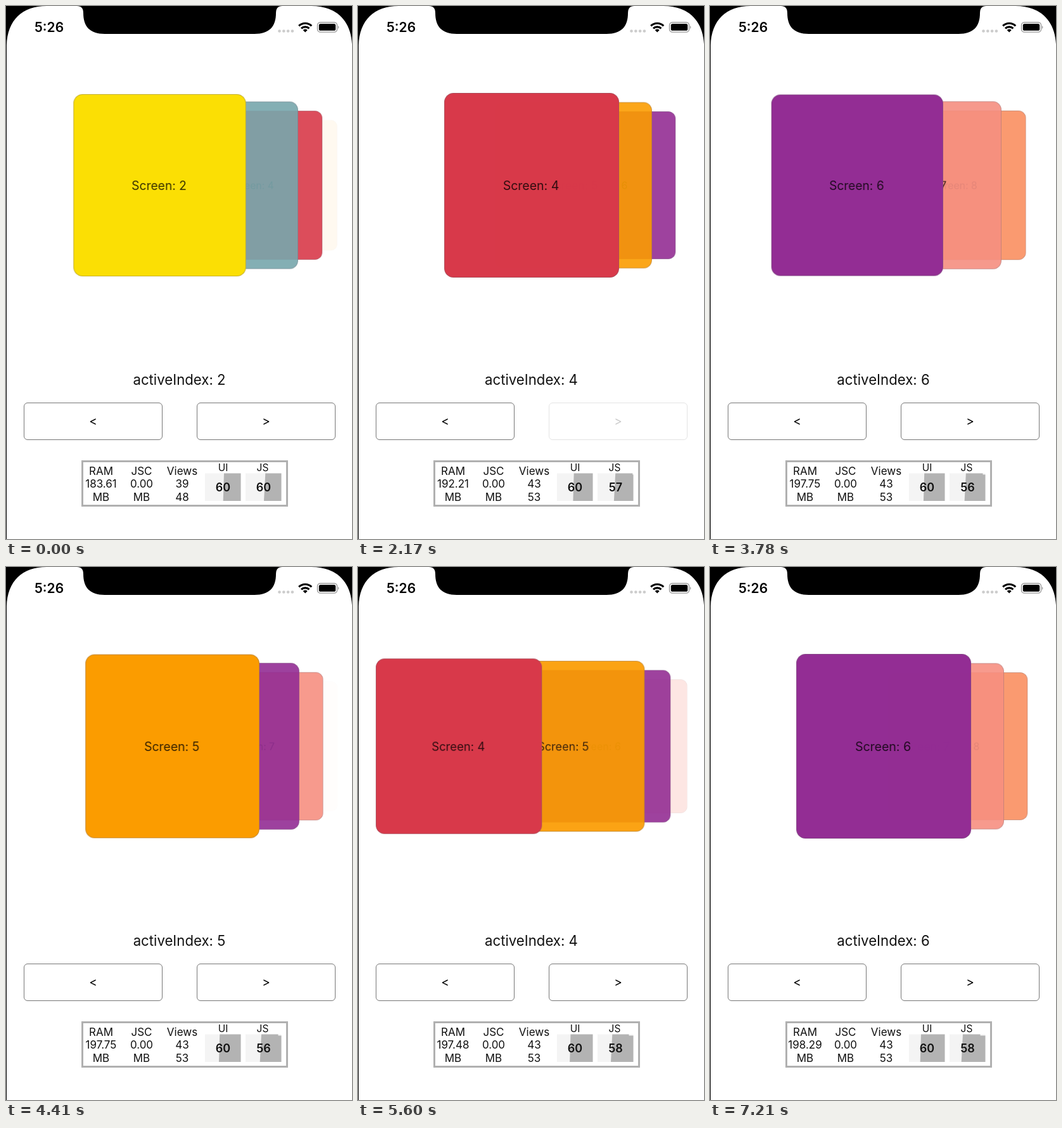
An HTML page for the animation above (7280 ms loop, 546x840 px).

```html
<!DOCTYPE html>
<html lang="en">
<head>
<meta charset="utf-8">
<title>Card stack</title>
<style>
  html, body { margin: 0; width: 100%; height: 100%; overflow: hidden; background: #fff; }
  body { position: relative; font-family: Inter, Roboto, sans-serif; color: #111; }
  #stage { position: absolute; left: 0; top: 0; width: 546px; height: 840px; overflow: hidden; background: #fff; }
  #stage > * { position: absolute; box-sizing: border-box; }
  .card {
    left: 136px; top: 137px; width: 276px; height: 291px; box-sizing: border-box;
    border: 1.4px solid rgba(110, 100, 110, .4); border-radius: 14.5px;
    display: flex; align-items: center; justify-content: center;
    font-size: 19.5px; color: rgba(0, 0, 0, .78); will-change: transform;
  }
  .card span { position: relative; left: -1px; }
  #active { left: 0; width: 547px; top: 574px; line-height: 29px; text-align: center; font-size: 22.2px; }
  .btn {
    top: 625px; width: 219px; height: 59px; border: 1px solid #777; border-radius: 6px;
    line-height: 58px; text-align: center; font-size: 19px; color: #000;
  }
  #stats { left: 118.5px; top: 715.5px; width: 326px; height: 73px; border: 3px solid #b0b0b0; }
  .col { top: 722.5px; width: 80px; text-align: center; font-size: 17px; line-height: 20.5px; white-space: pre; }
  .fps { top: 718px; width: 57px; text-align: center; font-size: 15.5px; line-height: 19px; }
  .num { top: 747px; width: 57px; text-align: center; font-size: 18px; font-weight: 600; line-height: 23px; }
  #clock { left: 45px; top: 20px; font-size: 21px; font-weight: 600; line-height: 28px; color: #000; }
  svg { left: 0; top: 0; }
</style>
</head>
<body>
<div id="stage">
  <div id="active"></div>
  <div class="btn" id="prev" style="left:28px">&lt;</div>
  <div class="btn" id="next" style="left:301px">&gt;</div>
  <div id="stats"></div>
  <svg width="546" height="840" viewBox="0 0 546 840">
    <path d="M0 0H546V60C544 22 520 0 482 0H436Q426 0 426 11C426 32 416 44 392 44H156C132 44 122 32 122 11Q122 0 112 0H64C26 0 2 22 1 62V840H0Z"/>
    <g fill="#ccc">
      <circle cx="431.5" cy="39.5" r="2.3"/><circle cx="438.3" cy="39.5" r="2.3"/>
      <circle cx="445.1" cy="39.5" r="2.3"/><circle cx="451.9" cy="39.5" r="2.3"/>
    </g>
    <g fill="none" stroke="#000" stroke-width="3.1">
      <path d="M462.2 31.4a14.3 14.3 0 0 1 20 0"/>
      <path d="M466 35.4a9 9 0 0 1 12.4 0"/>
    </g>
    <path d="M472.2 41.6l-3.5-3.6a5 5 0 0 1 7 0z"/>
    <rect x="491.5" y="25.7" width="31" height="15.4" rx="4.6" fill="none" stroke="#999" stroke-width="1.4"/>
    <rect x="493.8" y="28" width="26.4" height="10.8" rx="2.6"/>
    <path d="M524 31a3 3 0 0 1 0 5z" fill="#999"/>
    <rect x="314" y="736.5" width="56.5" height="43.5" fill="#f4f4f4"/>
    <rect x="378" y="736.5" width="56.5" height="43.5" fill="#f4f4f4"/>
    <path id="uiGraph" fill="#b3b3b3"/>
    <path id="jsGraph" fill="#b3b3b3"/>
  </svg>
  <div id="clock">5:26</div>
  <div class="col" id="ram" style="left:110px"></div>
  <div class="col" style="left:174px">JSC
0.00
MB</div>
  <div class="col" id="views" style="left:238px"></div>
  <div class="fps" style="left:314px">UI</div>
  <div class="fps" style="left:376.5px">JS</div>
  <div class="num" style="left:314px">60</div>
  <div class="num" id="js" style="left:378px"></div>
</div>
<script>
const LOOP = 7280, TICK = 70, FIRST = 2;
const colors = ['#fbdf04', '#78a7ad', '#d8394a', '#fb9c00', '#932d94', '#f68f81', '#fa8f60'];

// [release time, direction]
const taps = [
  [-510, 1], [350, 1], [1210, 1], [2220, 1], [2694, 1], [3040, 1],
  [3570, -1], [4171, -1], [5422, -1], [5830, 1], [6250, 1]
];
// [time, value]
const ramSteps = [[0, '183.61'], [1330, '192.21'], [3300, '197.75'], [5000, '197.48'], [6400, '198.29']];
const viewSteps = [[0, '39\n48'], [1330, '43\n53']];
const jsSteps = [[0, 60], [1400, 57], [2310, 58], [3500, 56], [5000, 58]];

const $ = id => document.getElementById(id);
const clamp = (v, lo = 0, hi = 1) => Math.min(hi, Math.max(lo, v));
const valueAt = (steps, t) => steps.filter(s => s[0] <= t).pop()[1];

// Step response of a spring with stiffness 100 and damping 10
function spring(ms) {
  if (ms <= 0) return 0;
  const s = ms / 1000, w = Math.sqrt(75);
  return 1 - Math.exp(-5 * s) * (Math.cos(w * s) + 5 / w * Math.sin(w * s));
}

const cards = colors.map((color, i) => {
  const el = document.createElement('div');
  el.className = 'card';
  el.style.background = color;
  el.style.zIndex = 20 - i;
  el.innerHTML = `<span>Screen: ${i + FIRST}</span>`;
  $('stage').append(el);
  return el;
});

function placeCard(el, r) {
  const scale = r < 0 ? 1 + .2 * r : 1 - .1 * r;
  const shift = r < 0 ? 484 * r : 73 * r;
  const alpha = r < 0 ? 1 : r < 1 ? 1 - .1 * r : r < 2 ? .9 : .9 * clamp(3 - r);
  el.style.visibility = r < -1.3 || alpha === 0 ? 'hidden' : 'visible';
  el.style.opacity = alpha;
  el.style.transform = `scale(${scale}) translateX(${shift}px)`;
}

function buttonAlpha(t, dir) {
  const hold = taps.filter(tap => tap[1] === dir).map(([end]) =>
    t < end ? clamp((t - end + 200) / 150) : clamp(1 - (t - end) / 170));
  return 1 - .8 * Math.max(...hold);
}

function graph(top, bottom, right, notch) {
  return `M${top} 736.5H${right - notch}v${notch ? 2 : 0}H${right}V780H${bottom}Z`;
}

function draw(t) {
  let index = 1, pos = 1;
  for (const [at, dir] of taps) {
    if (t >= at) index += dir;
    pos += dir * spring(t - at);
  }
  cards.forEach((el, i) => placeCard(el, i + FIRST - pos));
  $('active').textContent = 'activeIndex: ' + index;
  $('prev').style.opacity = buttonAlpha(t, -1);
  $('next').style.opacity = buttonAlpha(t, 1);

  $('ram').textContent = `RAM\n${valueAt(ramSteps, t)}\nMB`;
  $('views').textContent = 'Views\n' + valueAt(viewSteps, t);
  $('js').textContent = valueAt(jsSteps, t);
  const k = t / 7210;
  const ui = 344 - 11 * k, js = 409.3 - 10.3 * k;
  $('uiGraph').setAttribute('d', graph(ui, ui - 1.3, 370.5, 0));
  $('jsGraph').setAttribute('d', graph(js, js - 2.3, 434.5, clamp((t - 1400) / 600, 0, 8)));
}

const start = performance.now();
function frame() {
  const t = (performance.now() - start) % LOOP;
  draw(Math.floor(t / TICK) * TICK);
  requestAnimationFrame(frame);
}
frame();
</script>
</body>
</html>
```
